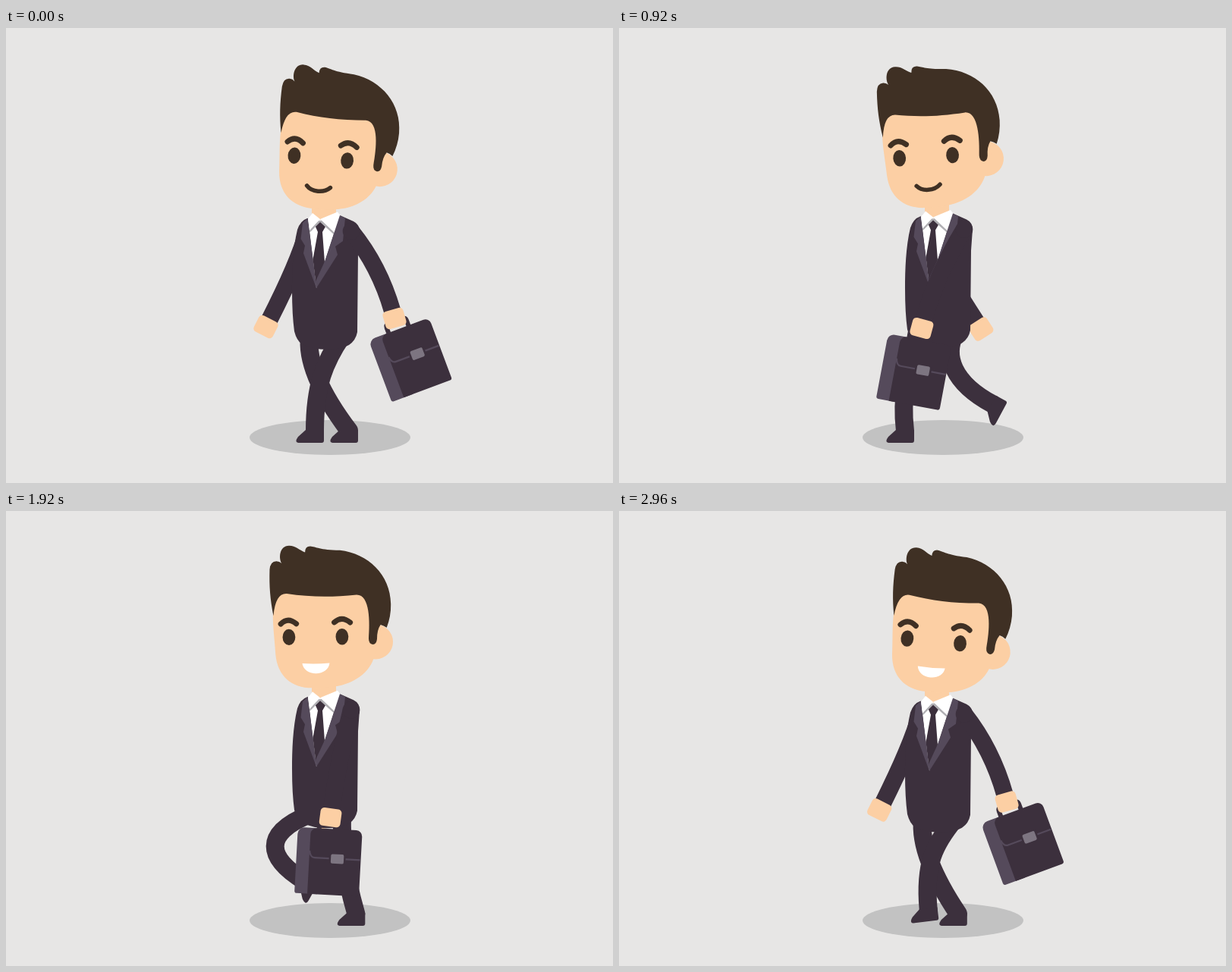
Write an HTML page with a canvas that moves like this. It is 800x600 px and loops after 3 s.

```html
<!DOCTYPE html>
<html lang="en">
<head>
<meta charset="utf-8">
<title>Walking businessman</title>
<style>
html, body { margin: 0; width: 100%; height: 100%; overflow: hidden; background: #e7e6e5; }
canvas { display: block; }
</style>
</head>
<body>
<canvas id="stage" width="800" height="600"></canvas>
<script>
const ctx = document.getElementById('stage').getContext('2d');
const LOOP = 3000, STEP = 1500;
const SUIT = '#3c303d', TRIM = '#554a5b', SKIN = '#fccfa4', HAIR = '#3f3024';
const { sin, cos, PI } = Math;
const rad = d => d * PI / 180;

function fill(d, color) {
  ctx.fillStyle = color;
  ctx.fill(new Path2D(d));
}

function line(d, color, width, cap = 'round') {
  ctx.strokeStyle = color;
  ctx.lineWidth = width;
  ctx.lineCap = cap;
  ctx.lineJoin = 'round';
  ctx.stroke(new Path2D(d));
}

function ellipse(x, y, rx, ry, color) {
  ctx.fillStyle = color;
  ctx.beginPath();
  ctx.ellipse(x, y, rx, ry, 0, 0, 2 * PI);
  ctx.fill();
}

function box(x, y, w, h, r, color) {
  ctx.fillStyle = color;
  ctx.beginPath();
  ctx.roundRect(x, y, w, h, r);
  ctx.fill();
}

// Draw inside a frame moved to (x, y) and turned by deg.
function at(x, y, deg, draw) {
  ctx.save();
  ctx.translate(x, y);
  ctx.rotate(rad(deg));
  draw();
  ctx.restore();
}

// Leg poses over one step: time, ankle y, foot turn, shin angle, thigh handle x, y
const POSES = [
  [0, 531, 0, 0, -23, 34],
  [170, 531, 0, 7, -12, 36],
  [420, 531, 0, 16, -1, 38],
  [750, 531, 0, 37, -4, 34],
  [810, 519, -41, 45, -8, 32],
  [930, 495, -62, 62, -16, 28],
  [1110, 487.5, -61, 61, -60, 27],
  [1170, 488.5, -61, 59, -62, 25],
  [1300, 504, -45, 40, -48, 30],
  [1460, 525, -7, 5, -28, 34]
];

function pose(i) {
  const n = POSES.length, turn = Math.floor(i / n), p = POSES[i - turn * n];
  return [p[0] + turn * STEP, ...p.slice(1)];
}

// Monotone cubic through the periodic poses
function sample(u, col) {
  let i = POSES.length - 1;
  while (POSES[i][0] > u) i--;
  const [a, b, c, d] = [-1, 0, 1, 2].map(k => pose(i + k));
  const slope = (p, q) => (q[col] - p[col]) / (q[0] - p[0]);
  const mean = (m, n) => m * n > 0 ? 2 * m * n / (m + n) : 0;
  const mid = slope(b, c), h = c[0] - b[0], s = (u - b[0]) / h;
  const m0 = mean(slope(a, b), mid) * h, m1 = mean(mid, slope(c, d)) * h;
  const s2 = s * s, s3 = s2 * s;
  return (2 * s3 - 3 * s2 + 1) * b[col] + (s3 - 2 * s2 + s) * m0 +
    (3 * s2 - 2 * s3) * c[col] + (s3 - s2) * m1;
}

function leg(u, hipX, hipY, shift) {
  const half = STEP / 2;
  const x = shift + (u < half
    ? 407 + 97 * u / half
    : 504 - 97 * (1 - cos(PI * (u - half) / half)) / 2);
  const [y, turn, shin, px, py] = [1, 2, 3, 4, 5].map(c => sample(u, c));
  const a = rad(shin), k = 60;
  line(`M${hipX} ${hipY} C${hipX + px} ${hipY + py} ${x - k * sin(a)} ${y - k * cos(a)} ${x} ${y}`, SUIT, 24);
  at(x, y, turn, () => fill(
    'M-12-1 L-22 8 Q-25 12 -24.5 14 Q-24 16 -20 16 H9 Q12 16 12 13 V-1 Z', SUIT));
}

function arm(sx, sy, hand, reach) {
  const a = rad(hand.turn);
  const wx = hand.x + 10 * sin(a), wy = hand.y - 10 * cos(a);
  line(`M${sx} ${sy} Q${wx + reach * sin(a)} ${wy - reach * cos(a)} ${wx} ${wy}`, SUIT, 22.5, 'butt');
  ellipse(sx, sy, 11.3, 11.3, SUIT);
}

function fist(hand) {
  at(hand.x, hand.y, hand.turn, () => box(-14, -12, 28, 24, 5, SKIN));
}

function bag() {
  line('M-14 18 V8 Q-14 4 -10 4 H10 Q14 4 14 8 V18', SUIT, 6);
  box(-42, 15, 30, 87, [9, 0, 0, 3], TRIM);
  box(-25, 15, 68, 87, [8, 8, 3, 0], SUIT);
  line('M-25 45 Q-24 54 -18 54 H42', TRIM, 2.2, 'butt');
  box(1, 47.5, 22, 14, 2, SUIT);
  box(3.5, 48, 17, 12.5, 2, '#7d7581');
}

function torso() {
  fill('M397 245 Q388 248 384 260 C378 285 377 315 377 340 Q377 372 380 394 ' +
    'Q383 406 390 411 Q405 418 422 418 Q442 418 452 412 Q461 406 463 395 ' +
    'L464 290 L466 262 Q466 253 458 249 L440 241 Z', SUIT);
  box(403, 224, 32, 26, 0, SKIN);
  fill('M398 245 L404 240 L414 247 L437 238 L440 241 L409 337 Z', '#fff');
  fill('M407.5 255 L414 249 L421 256 L417 263 L420 303 L409 336 L404.5 299 L411 263 Z', SUIT);
  fill('M400 264 L398 246 L414 248 L440 242 L433 267 L414 250 Z', '#b0afb3');
  fill('M398 246 L404 238 L414 246 L400 261 Z M437 236.5 L441 242 L433 264 L414 246 Z', '#fff');
  fill('M397.5 245 L391 251 L388.5 272 L394 281 L392 291 L409 337 L404.5 298 Z', TRIM);
  fill('M440 241 L447 245 L444 275 L434 282 L437 293 L409 337 L408 328 L420 302 Z', TRIM);
}

function head(open) {
  ellipse(488, 173.5, 23, 23, SKIN);
  fill('M354 125 C352 145 355 165 356 188 C358 216 376 233 405 233 H420 ' +
    'C454 232 477 217 485 196 L496 165 L482 105 H362 Z', SKIN);
  fill('M354 137 C350 115 349 98 350 76 Q351 65 359 65 Q363 65 366 68 ' +
    'C362 62 363 45 376 45 C385 45 389 51 397 54 Q397 46 404 46 ' +
    'C412 47 416 51 443 52 C480 57 509 85 509 124 Q509 140 503 155 ' +
    'Q499 152 495 151 Q490 158 490 170 Q489 177 484.5 177 Q479 176 479 169 ' +
    'C481 148 482 111 464 111 C430 114 402 113 372 108 ' +
    'Q357 107 354 137 Z', HAIR);
  line('M363.5 148 Q373 138.5 384 148', HAIR, 7);
  line('M434 147 Q444 138 455 147.5', HAIR, 7);
  ellipse(374, 165.5, 8.4, 10.7, HAIR);
  ellipse(444, 166, 8.4, 10.7, HAIR);
  if (open) fill('M391 200.5 Q409 202 427 200.5 C426 209 418 214 409 214 C400 214 392 209 391 200.5 Z', '#fff');
  else line('M394 203.5 C401 211.5 417 211.5 425 203.5', HAIR, 5.5);
}

function draw(time) {
  const t = time % LOOP, u = t % STEP, f = 2 * PI * u / STEP;
  const c = cos(f), c2 = cos(2 * f), skew = sin(2 * f) - 2 * sin(f);
  const bob = 3 + 3 * c2;

  const free = {
    x: 415.7 - 79.8 * c + 6.6 * c2,
    y: 399.2 + 1.6 * c - 6.8 * c2,
    turn: -7 + 34 * c
  };
  const tilt = -1.9 - 18.3 * c - 0.3 * c2 - 0.57 * skew;
  const grip = {
    x: 445 + 68 * c - c2 + 2.4 * skew,
    y: 395.1 - 2.95 * c - 9.15 * c2,
    turn: tilt + 4.5
  };

  ctx.fillStyle = '#e7e6e5';
  ctx.fillRect(0, 0, 800, 600);
  ellipse(427, 540, 106, 23, '#c2c2c2');

  arm(397, 262 + bob, free, 85);
  fist(free);
  leg((u + STEP / 2) % STEP, 400, 400 + bob, -52);
  leg(u, 443, 400 + bob, 0);
  at(0, bob, 0, torso);
  at(414, 232 + bob, 5 * c, () => at(-414, -232, 0, () => head(t >= STEP)));
  arm(455, 262 + bob, grip, 62);
  at(grip.x, grip.y, tilt, bag);
  fist(grip);
}

let start;
function tick(now) {
  if (start === undefined) start = now;
  draw(now - start);
  requestAnimationFrame(tick);
}
draw(0);
requestAnimationFrame(tick);
</script>
</body>
</html>
```
